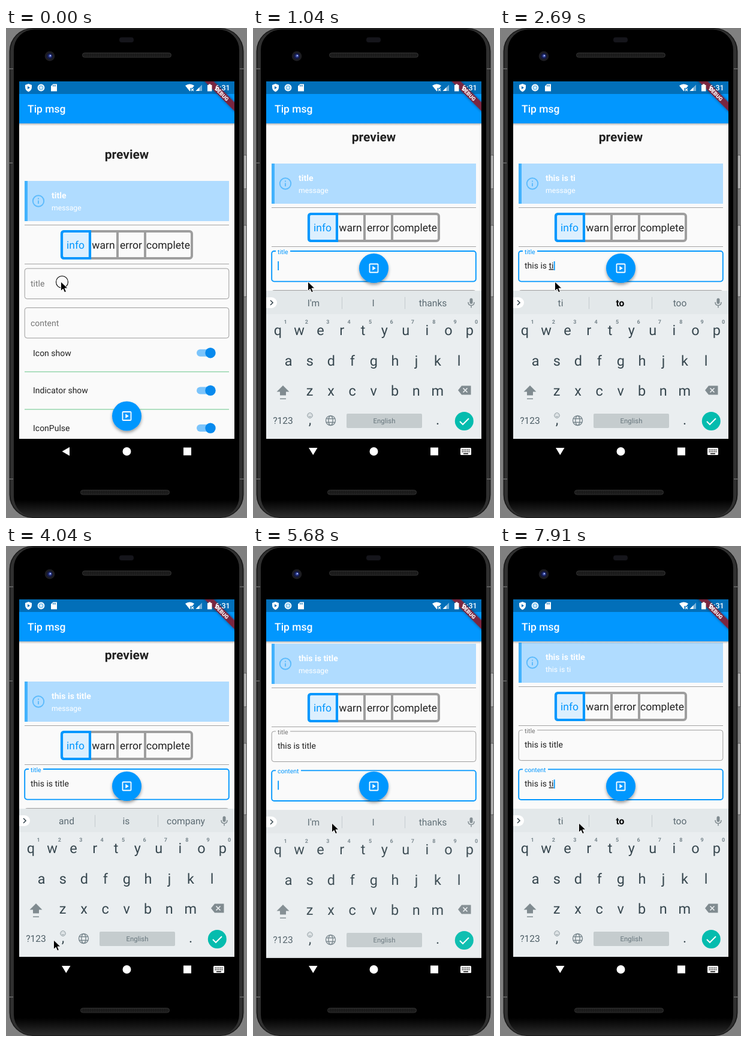
Recreate the animation shown at these times as an HTML page. Size 402 by 817 pixels, loop 8 s.

```html
<!DOCTYPE html>
<html lang="en">
<head>
<meta charset="utf-8">
<title>Tip msg</title>
<style>
  html, body { margin: 0; width: 100%; height: 100%; overflow: hidden; background: #808080; }
  svg { display: block; width: 402px; height: 817px; font-family: Roboto, sans-serif; }
  text { white-space: pre; text-rendering: geometricPrecision; }
  .mid { text-anchor: middle; }
  .body-text { font-size: 14px; fill: #212121; }
  .seg { font-size: 17.5px; fill: #212121; text-anchor: middle; }
  .letter { font-size: 23.5px; fill: #37474f; text-anchor: middle; }
  .digit { font-size: 9px; font-weight: 700; fill: #78868d; text-anchor: middle; }
  .suggestion { font-size: 15.6px; fill: #5b6a72; text-anchor: middle; }
  .composing { text-decoration: underline; }
</style>
</head>
<body>
<svg viewBox="0 0 402 817">
  <defs>
    <clipPath id="bodyClip"><rect id="bodyRect" x="22" y="159" width="359" height="526"/></clipPath>
    <clipPath id="screenClip"><rect x="22" y="89" width="359" height="638"/></clipPath>
    <pattern id="mesh" width="3" height="3" patternUnits="userSpaceOnUse">
      <rect width="3" height="3" fill="#161616"/><circle cx="1.5" cy="1.5" r=".8" fill="#333"/>
    </pattern>
    <linearGradient id="barShadow" x2="0" y2="1">
      <stop stop-color="#000" stop-opacity=".26"/><stop offset="1" stop-color="#000" stop-opacity="0"/>
    </linearGradient>
    <linearGradient id="glass" x2="0" y2="1">
      <stop offset=".965"/><stop offset="1" stop-color="#2c2c2c"/>
    </linearGradient>
    <filter id="lift" x="-30%" y="-30%" width="160%" height="170%">
      <feDropShadow dx="0" dy="3" stdDeviation="2.6" flood-opacity=".38"/>
    </filter>
    <filter id="soft" x="-30%" y="-80%" width="160%" height="260%">
      <feDropShadow dx="0" dy="0" stdDeviation="2" flood-opacity=".5"/>
    </filter>
  </defs>

  <!-- phone -->
  <rect width="402" height="817" fill="#808080"/>
  <g fill="#b0b0b0" stroke="#4a4a4a" stroke-width=".8">
    <rect x="396" y="212" width="5.500" height="56" rx="1.500"/>
    <rect x="396" y="329" width="5.500" height="119" rx="1.500"/>
  </g>
  <rect x="5.500" y="0" width="391" height="817" rx="39" fill="#1a1a1a"/>
  <rect x="7.500" y="1.500" width="387" height="814" rx="37" fill="#303030"/>
  <rect x="13" y="2.500" width="376" height="813" rx="34" fill="url(#glass)"/>
  <path d="M5 68h7M390 68h7M5 752h7M390 752h7M5 225h6" stroke="#5c5c5c" stroke-width="2"/>
  <rect x="189" y="15.500" width="24" height="8.500" rx="4" fill="#15151b"/>
  <circle cx="73" cy="47" r="8.300" fill="#1c1c21"/>
  <circle cx="73" cy="47" r="5" fill="#151b4a"/>
  <circle cx="73.500" cy="46.500" r="2.600" fill="#3d4fa8"/>
  <circle cx="74" cy="46" r="1.100" fill="#c9d2ff"/>
  <g fill="url(#mesh)" stroke="#333">
    <rect x="127.500" y="41.500" width="148" height="7.500" rx="3.700"/>
    <rect x="124.500" y="770.500" width="148" height="7.500" rx="3.700"/>
  </g>

  <rect x="22" y="89" width="359" height="596" fill="#fafafa"/>

  <!-- scrolling page -->
  <g clip-path="url(#bodyClip)">
    <g id="page">
      <text class="mid" x="201.500" y="218" font-size="21" font-weight="700" fill="#212121">preview</text>
      <rect x="31" y="255" width="341" height="67" fill="#b0dcff"/>
      <rect x="31" y="255" width="5" height="67" fill="#42b2fd"/>
      <g fill="none" stroke="#5dbbfc" stroke-width="1.900">
        <circle cx="54" cy="288.500" r="9.200"/><path d="M54 287.500v5.500M54 283.500v2"/>
      </g>
      <g fill="#fff">
        <text id="tipTitle" x="76" y="283.500" font-size="14" font-weight="700"></text>
        <text id="tipMessage" x="76" y="304" font-size="12.200"></text>
      </g>
      <path d="M31 328.500h341M31 393.500h341" stroke="#a3a3a3"/>
      <rect x="93" y="339" width="217" height="45" rx="4" fill="none" stroke="#9e9e9e" stroke-width="4"/>
      <path d="M186 339v45M232 339v45" stroke="#9e9e9e" stroke-width="4"/>
      <path d="M140 339H97q-4 0-4 4v37q0 4 4 4h43z" fill="#dceffe" stroke="#0297fe" stroke-width="4.200"/>
      <g class="seg">
        <text x="116" y="368" fill="#0297fe">info</text><text x="162.500" y="368">warn</text>
        <text x="208.500" y="368">error</text><text x="270.500" y="368">complete</text>
      </g>
      <g id="fields"></g>
      <g id="switches"></g>
    </g>
  </g>

  <g id="fab">
    <circle r="24.500" fill="#0297fe" filter="url(#lift)"/>
    <rect x="-7" y="-7" width="14" height="14" rx="1" fill="none" stroke="#fff" stroke-width="1.800"/>
    <path d="M-2.200-3.800L3.300 0l-5.500 3.800z" fill="#fff"/>
  </g>

  <!-- app bar, status bar -->
  <rect x="22" y="159" width="359" height="4" fill="url(#barShadow)"/>
  <rect x="22" y="89" width="359" height="70" fill="#0297fe"/>
  <rect x="22" y="89" width="359" height="21" fill="#026fb9"/>
  <text x="36" y="141" font-size="17.500" font-weight="500" fill="#fff">Tip msg</text>
  <g clip-path="url(#screenClip)">
    <g transform="translate(381 89) rotate(45)">
      <rect x="-50" y="24.500" width="100" height="10.500" fill="#7a2840" filter="url(#soft)"/>
      <text class="mid" y="33" font-size="8.900" font-weight="900" fill="#fff">DEBUG</text>
    </g>
  </g>
  <g fill="#fff">
    <path d="M37.500 93l5.500 2v4q0 5-5.500 7.500-5.500-2.500-5.500-7.500v-4z"/>
    <path d="M36 97l4 2.500-4 2.500z" fill="#026fb9"/>
    <circle cx="58.500" cy="99.500" r="5" fill="#7fc4ef" stroke="#fff" stroke-width="1.800"/>
    <circle cx="58.500" cy="99.500" r="2.200" fill="#d9f0ff"/>
    <path d="M78.500 93.500H85v12H75V97z"/>
    <path d="M78.500 95v2.500M80.500 95v2.500M82.500 95v2.500" stroke="#026fb9"/>
    <path d="M299 96q7.500-5 15 0l-3 4h-3.500v4.500l-1 1z"/>
    <path d="M309 101l4 4m0-4l-4 4" stroke="#fff" stroke-width="1.200"/>
    <path d="M316.500 105L327 94.500V105z" opacity=".45"/><path d="M316.500 105l6-6v6z"/>
    <path d="M336 95h2v-1.500h3.500V95h2v10.500H336z"/>
    <text x="349" y="104" font-size="12.500" font-weight="500">6:31</text>
  </g>

  <!-- keyboard -->
  <g clip-path="url(#screenClip)">
    <g id="keyboard">
      <rect x="22" y="438" width="359" height="247" fill="#eaeef0"/>
      <rect x="22" y="438" width="359" height="39" fill="#e3e8ea"/>
      <path d="M22 449h9a9 9 0 0 1 0 18h-9z" fill="#fff"/>
      <path d="M29 454l4 4-4 4" fill="none" stroke="#37474f" stroke-width="1.600"/>
      <path d="M148.500 448.500v20M253.500 448.500v20" stroke="#c3cacd"/>
      <g id="suggestions"></g>
      <g fill="#808b90">
        <rect x="361.500" y="450.500" width="5" height="9.500" rx="2.500"/>
        <path d="M359 457q0 5.500 5 5.500t5-5.500M364 462.500v4" fill="none" stroke="#808b90" stroke-width="1.500"/>
        <path d="M50 596l10.500 10.500H55v6H45v-6h-5.500zM45 617.500h10v1.500H45z"/>
        <path d="M348 596.500h15.500v15H348l-6-7.500z"/>
        <path d="M350.500 600.500l7 7m0-7l-7 7" stroke="#eaeef0" stroke-width="1.700"/>
      </g>
      <g id="keys"></g>
      <text class="mid" x="50" y="660" font-size="15.600" fill="#4f5f67">?123</text>
      <g fill="none" stroke="#78868d">
        <circle cx="95" cy="646" r="4.200" stroke-width=".9"/>
        <path d="M92.800 647q2.200 2.700 4.400 0M93.500 644.200v1M96.500 644.200v1" stroke-width=".9"/>
        <g stroke-width="1.400">
          <circle cx="129.500" cy="654.500" r="8"/><ellipse cx="129.500" cy="654.500" rx="3.600" ry="8"/>
          <path d="M122.500 651.500h14M122.500 657.500h14"/>
        </g>
      </g>
      <rect x="156" y="643" width="126" height="24" rx="2" fill="#c5ccce"/>
      <text class="mid" x="219" y="659" font-size="11.400" fill="#67767d">English</text>
      <circle cx="352.300" cy="655.500" r="15.500" fill="#04bcae"/>
      <path d="M345 656l5 5 10-10" fill="none" stroke="#fff" stroke-width="2"/>
    </g>
  </g>

  <!-- navigation -->
  <g fill="#fff">
    <path id="navBack" d="M93.500 706l12.500-7.300v14.600z"/>
    <circle cx="201.500" cy="706" r="7"/>
    <rect x="296" y="699.500" width="13" height="13"/>
    <g id="navOpen">
      <path d="M93 700h14.500l-7.250 12z"/>
      <rect x="346" y="700" width="18" height="12" rx="1.500"/>
      <path d="M348.500 703.500h13M348.500 706.500h13" stroke="#000" stroke-width="1.600" stroke-dasharray="1.600 1.200"/>
      <path d="M351 709.700h8" stroke="#000" stroke-width="1.500"/>
    </g>
  </g>

  <g id="pointer">
    <circle id="ring" cx="2" cy=".5" r="10" fill="none" stroke="#000" stroke-width="1.100"/>
    <path d="M0 0v15.500l3.700-3.500 2.500 5.800 2.700-1.200-2.500-5.600h5z" fill="#000" stroke="#fff" stroke-width=".9"/>
  </g>
</svg>

<script>
const LOOP = 8000;
const BLUE = "#0297fe";
const $ = id => document.getElementById(id);
const set = (el, attrs) => { for (const k in attrs) el.setAttribute(k, attrs[k]); };

// Each track lists [time, ...values]; the latest entry holds until the next.
const tracks = {
  // keyboard shift, keyboard opacity, page scroll, keyboard reserves space
  layout: [
    [0, 0, 0, 0, false], [600, 66, .15, 0, true], [750, 40, .6, 0, true],
    [890, 3, .95, 26, true], [1040, 0, 1, 29, true],
    [4630, 24, .6, 29, false], [4780, 0, 0, 29, false],
    [5380, 66, .15, 29, true], [5530, 40, .6, 29, true],
    [5680, 2, .95, 92, true], [5820, 0, 1, 94, true]
  ],
  // focused field, label float progress
  focus: [[0, -1, 0], [450, 0, .4], [600, 0, 1], [5380, 1, .5], [5530, 1, 1]],
  caret: [[0, false], [600, true], [3590, false], [4180, true], [4630, false], [5080, true]],
  ring: [[0, true], [150, false], [4480, true], [4630, false], [5230, true], [5380, false]],
  pointer: [
    [0, 91.5, 423], [3590, 89, 462], [3740, 83, 540], [3890, 79, 615], [4040, 79.5, 657],
    [4180, 88, 685], [4330, 98, 702], [4480, 100, 706], [4780, 102, 690],
    [4930, 109, 590], [5080, 116, 502], [5230, 129, 470], [5380, 131.5, 462]
  ],
  title: [
    [0, ""], [1190, "t"], [1340, "th"], [1490, "thi"], [1640, "this"], [1790, "this "],
    [1940, "this i"], [2090, "this is"], [2240, "this is "], [2540, "this is t"],
    [2690, "this is ti"], [2840, "this is tit"], [2990, "this is title"], [3140, "this is title "]
  ],
  content: [
    [0, ""], [6120, "t"], [6270, "th"], [6420, "thi"], [6560, "this"], [6710, "this "],
    [7010, "this i"], [7160, "this is"], [7310, "this is "], [7760, "this is t"], [7910, "this is ti"]
  ]
};

// Suggestions follow the text being typed.
const hints = {
  "": "I'm|I|thanks", t: "to|the|that", th: "the|that|this", thi: "this|think|thing",
  this: "this|This|this'll", "this ": "is|was|I", "this i": "is|I|it", "this is": "is|Is|it",
  "this is ": "the|not|a", "this is t": "the|to|that", "this is ti": "ti|to|too",
  "this is tit": "tit|title|titles", "this is title": "title|titles|titled",
  "this is title ": "and|is|company"
};

const at = (name, t) => tracks[name].findLast(step => step[0] <= t).slice(1);
const times = [...new Set(Object.values(tracks).flat().map(step => step[0]))].sort((a, b) => a - b);

// Keys
const textAt = (cls, x, y, s) => `<text class="${cls}" x="${x}" y="${y}">${s}</text>`;
const keyRow = (letters, x, y) => [...letters].map((c, i) => textAt("letter", x + i * 35.55, y, c)).join("");
$("keys").innerHTML =
  keyRow("qwertyuiop", 41.5, 512) + keyRow("asdfghjkl", 59.2, 562.5) + keyRow("zxcvbnm", 94.5, 612.5) +
  [..."1234567890"].map((c, i) => textAt("digit", 54 + i * 35.4, 492.5, c)).join("") +
  textAt("letter", 95, 661, ",") + textAt("letter", 308, 661, ".");
$("suggestions").innerHTML = [101, 200.5, 300].map(x => textAt("suggestion", x, 464, "")).join("");
const slots = [...$("suggestions").children];

// Switch rows
$("switches").innerHTML = ["Icon show", "Indicator show", "IconPulse"].map((name, i) => `
  <g transform="translate(0 ${541.7 + i * 62.7})">
    <text class="body-text" x="45" y="5">${name}</text>
    <rect x="318" y="-6" width="29" height="12" rx="6" fill="#7bc4fb"/>
    <circle cx="341" r="8.7" fill="#078aee"/>
    <path d="M31 31.500h341" stroke="#66c487"/>
  </g>`).join("");

// Text fields
$("fields").innerHTML = ["title", "content"].map((name, i) => `
  <g transform="translate(0 ${401 + i * 65.4})">
    <rect class="box" x="31.200" width="340.600" height="50.600" rx="4" fill="none"/>
    <rect class="notch" x="38" y="-2" height="4" fill="#fafafa"/>
    <text class="label" font-size="14">${name}</text>
    <text class="body-text" x="41" y="29"><tspan class="done"></tspan><tspan class="composing"></tspan></text>
    <rect class="caret" y="17" width="1.800" height="15" fill="${BLUE}"/>
  </g>`).join("");

function drawField(el, text, focused, float, caretOn) {
  const part = cls => el.querySelector("." + cls);
  const raised = text ? 1 : float;
  const scale = 1 - raised * .25;
  const label = part("label");
  const word = focused ? text.match(/\S*$/)[0] : "";
  set(part("box"), { stroke: focused ? BLUE : "#9a9a9a", "stroke-width": focused ? 1.9 : 1 });
  set(label, {
    transform: `translate(41 ${30.3 - raised * 25.5}) scale(${scale})`,
    fill: focused ? BLUE : "#757575"
  });
  set(part("notch"), { width: raised === 1 ? label.getComputedTextLength() * .75 + 6.5 : 0 });
  part("done").textContent = text.slice(0, text.length - word.length);
  part("composing").textContent = word;
  const width = text ? part("body-text").getComputedTextLength() : 0;
  set(part("caret"), { x: 41.3 + width, opacity: focused && caretOn ? 1 : 0 });
}

function draw(t) {
  const [shift, opacity, scroll, resized] = at("layout", t);
  const [focus, float] = at("focus", t);
  const [caretOn] = at("caret", t);
  const [x, y] = at("pointer", t);
  const texts = [at("title", t)[0], at("content", t)[0]];

  set($("bodyRect"), { height: resized ? 279.5 : 526 });
  set($("page"), { transform: `translate(0 ${-scroll})` });
  set($("fab"), { transform: `translate(201.5 ${resized ? 400.5 : 647})` });
  set($("keyboard"), { transform: `translate(0 ${shift})`, opacity });
  set($("navBack"), { opacity: resized ? 0 : 1 });
  set($("navOpen"), { opacity: resized ? 1 : 0 });
  set($("pointer"), { transform: `translate(${x} ${y})` });
  set($("ring"), { opacity: at("ring", t)[0] ? 1 : 0 });

  $("tipTitle").textContent = texts[0] || "title";
  $("tipMessage").textContent = texts[1] || "message";
  [...$("fields").children].forEach((el, i) =>
    drawField(el, texts[i], i === focus, i === focus ? float : 0, caretOn));

  const typed = texts[Math.max(focus, 0)];
  const words = hints[typed].split("|");
  const corrected = typed === "this is ti";
  slots.forEach((slot, i) => { slot.textContent = words[i]; });
  slots[1].style.cssText = corrected ? "font-weight:700;fill:#000" : "";
}

let shown = -1;
function tick(now) {
  const t = now % LOOP;
  const step = times.findLastIndex(time => time <= t);
  if (step !== shown) draw(times[shown = step]);
  requestAnimationFrame(tick);
}
draw(0);
requestAnimationFrame(tick);
</script>
</body>
</html>
```
